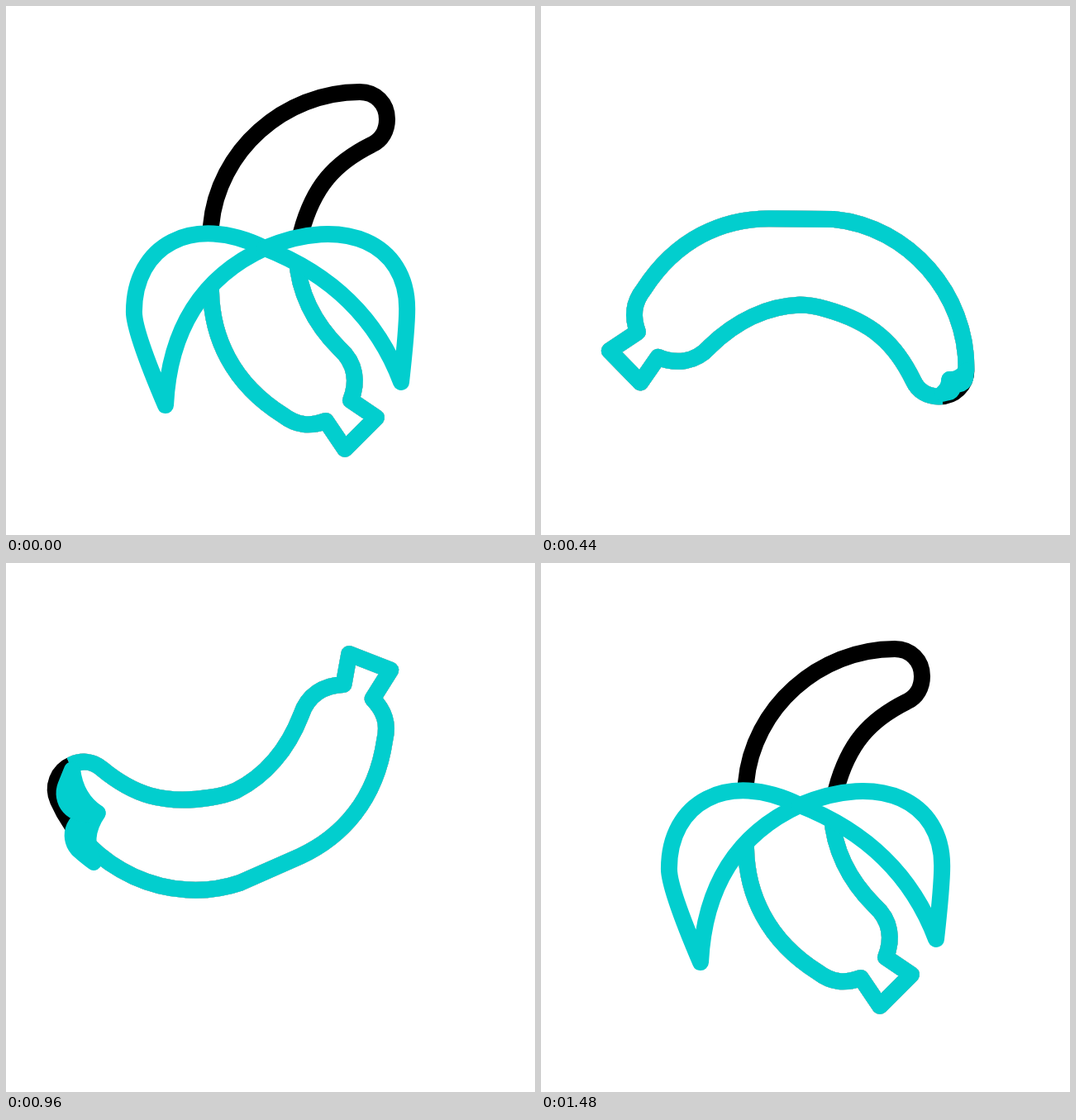
An HTML page with a canvas for the animation above (2000 ms loop, 640x640 px).

```html
<!DOCTYPE html>
<html lang="en">
<head>
<meta charset="utf-8">
<title>Peeling banana</title>
<style>
  html, body { margin: 0; height: 100%; overflow: hidden; background: #fff; }
  canvas { display: block; }
</style>
</head>
<body>
<canvas width="640" height="640"></canvas>
<script>
const ctx = document.querySelector('canvas').getContext('2d');
const TEAL = '#02cece', LOOP = 2000, TURN = 1480, STEP = 40;
const CLOSE_TIME = 500, OPEN_START = 760, OPEN_TIME = 610;
const PIVOT = [305.2, 314.7];

const body = new Path2D(`M410 536L387 502C368 509 352 508 335 495
  C273 456 249 400 248 345L248 266C256 175 337 104 428 104
  C447 104 461 118 461 137C461 150 455 162 442 168
  C398 190 372 218 357 274Q352 292 352 306C354 345 372 383 404 415
  C423 432 426 455 417 477L448 498Z`);

// The peels share a base; base and tips slide along cubic curves from closed to open.
const baseTrack = [[455, 122], [380, 130], [320, 190], [313, 293]];

// Leaf outlines as [along, across] fractions of the line from base to tip:
// shoulder, two arc controls, inner control.
const peels = [
  {
    side: 1,
    tipTrack: [[447, 112], [371, 61], [79, 197], [193, 483]],
    folded: [[.75, .35], [.53, .57], [.09, .505], [.52, .3]],
    open: [[.665, .412], [.364, .602], [.047, .434], [.464, .302]]
  },
  {
    side: -1,
    tipTrack: [[461, 140], [437, 90], [485, 192], [478, 455]],
    folded: [[.787, .275], [.607, .5], [.165, .53], [.47, .23]],
    open: [[.753, .296], [.516, .537], [.175, .42], [.522, .222]]
  }
];

const mix = (p, q, k) => p.map((v, i) => v + (q[i] - v) * k);

function bezier(points, k) {
  while (points.length > 1)
    points = points.slice(1).map((q, i) => mix(points[i], q, k));
  return points[0];
}

// cubic-bezier(.2, 0, .8, 1)
function ease(x) {
  if (x <= 0 || x >= 1) return x <= 0 ? 0 : 1;
  let lo = 0, hi = 1, s;
  for (let i = 0; i < 24; i++) {
    s = (lo + hi) / 2;
    if (.6 * s * (1 - s) ** 2 + 2.4 * s * s * (1 - s) + s ** 3 < x) lo = s;
    else hi = s;
  }
  return s * s * (3 - 2 * s);
}

const opennessAt = t => t < OPEN_START
  ? 1 - ease(t / CLOSE_TIME)
  : ease((t - OPEN_START) / OPEN_TIME);

function peelPoints({ side, tipTrack, folded, open }, openness) {
  const base = bezier(baseTrack, openness), tip = bezier(tipTrack, openness);
  const [dx, dy] = [tip[0] - base[0], tip[1] - base[1]];
  const place = ([along, across]) => [
    base[0] + dx * along - dy * across * side,
    base[1] + dy * along + dx * across * side
  ];
  // The leaf only spreads out near the end of its travel
  const shape = folded.map((p, i) => mix(p, open[i], openness ** 16));
  const [shoulder, arc1, arc2, inner] = shape.map(place);
  return { tip, base, shoulder, arc1, arc2, inner, bend: mix(arc1, shoulder, 1.3) };
}

const leaf = p => new Path2D(`M${p.tip}Q${p.bend} ${p.shoulder}
  C${p.arc1} ${p.arc2} ${p.base}Q${p.inner} ${p.tip}Z`);

// Everything below the outer edges of both peels
const skinArea = (l, r) => new Path2D(`M-300-300H${l.tip[0]}L${l.tip}
  Q${l.bend} ${l.shoulder}C${l.arc1} ${l.arc2} ${l.base}
  C${r.arc2} ${r.arc1} ${r.shoulder}Q${r.bend} ${r.tip}H900V900H-300Z`);

function stroke(path, color) {
  ctx.strokeStyle = color;
  ctx.stroke(path);
}

function draw(t) {
  const openness = opennessAt(t);
  ctx.setTransform(1, 0, 0, 1, 0, 0);
  ctx.fillStyle = '#fff';
  ctx.fillRect(0, 0, 640, 640);
  ctx.lineWidth = 20;
  ctx.lineJoin = ctx.lineCap = 'round';
  ctx.translate(...PIVOT);
  ctx.rotate(2 * Math.PI * ease(t / TURN));
  ctx.translate(-PIVOT[0], -PIVOT[1]);

  if (openness === 0) {
    stroke(body, TEAL);
    return;
  }
  const sides = peels.map(p => peelPoints(p, openness));
  const leaves = sides.map(leaf);
  stroke(body, '#000');
  ctx.save();
  ctx.clip(skinArea(...sides));
  // Cover the black edge before recolouring the skin
  stroke(body, '#fff');
  stroke(body, TEAL);
  ctx.restore();
  leaves.forEach(l => ctx.fill(l));
  leaves.forEach(l => stroke(l, TEAL));
}

function tick(now) {
  draw(Math.floor(now % LOOP / STEP) * STEP);
  requestAnimationFrame(tick);
}
tick(performance.now());
</script>
</body>
</html>
```
